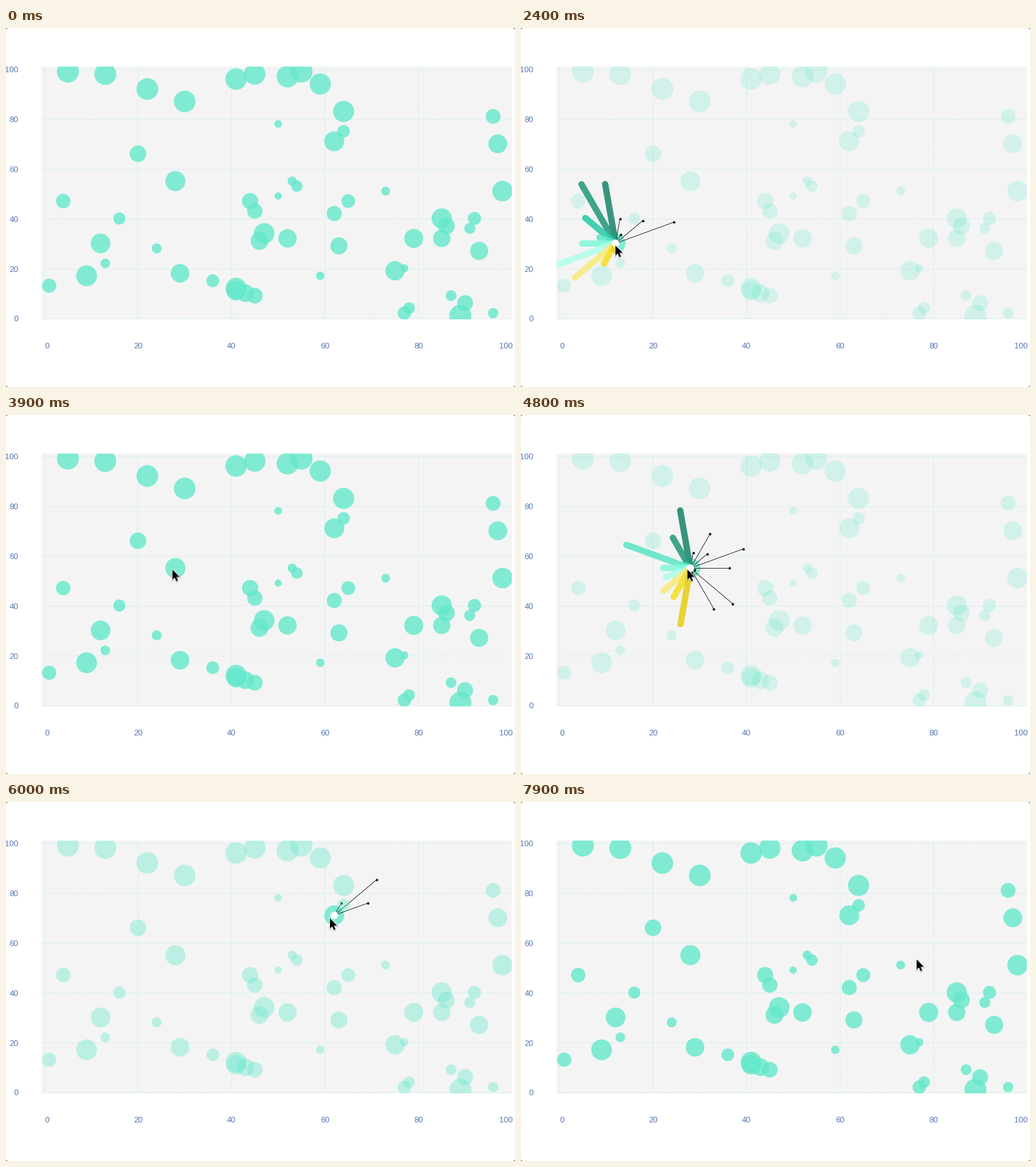
A matplotlib script that plays this animation: 806x568 px, repeating every 8000 ms.

```python
import numpy as np
import matplotlib.pyplot as plt
from matplotlib.animation import FuncAnimation
from matplotlib.patches import Circle, Polygon, Rectangle

W, H, DPI = 806, 568, 64
PX = 72 / DPI  # points per pixel
STEP, FRAMES = 100, 80

MINT = (100 / 255, 232 / 255, 203 / 255)
FULL, DIM = 0.8, 0.24
BAR_COLORS = ["#238a70", "#2c9c80", "#30cbab", "#62e6c8", "#86f9dd",
              "#b4fdea", "#f8ec82", "#f5df2c", "#e8cf22"]

# the chart's data, from the largest bubble to the smallest
POINTS = [
    (5, 99), (55, 99), (89, 1), (13, 98), (52, 97), (22, 92), (30, 87),
    (41, 96), (45, 98), (59, 94), (64, 83), (41, 12), (9, 17), (47, 34),
    (98, 51), (85, 40), (28, 55), (62, 71), (12, 30), (41, 11), (75, 19),
    (79, 32), (97, 70), (29, 18), (52, 32), (93, 27), (46, 31), (43, 10),
    (85, 32), (63, 29), (86, 37), (20, 66), (44, 47), (90, 6), (45, 9),
    (45, 43), (62, 42), (96, 81), (4, 47), (1, 13), (65, 47), (77, 2),
    (92, 40), (36, 15), (64, 75), (16, 40), (78, 4), (54, 53), (91, 36),
    (87, 9), (96, 2), (24, 28), (13, 22), (53, 55), (73, 51), (59, 17),
    (77, 20), (50, 78), (50, 49),
]

# start time, bubble, mean spoke length, its slope, waves (height, peak, period)
BURSTS = [
    (1850, (12, 30), 55, 2.5, [(45, -0.25, 4.9)]),
    (3900, (28, 55), 54, 0, [(36, 2, 2.5), (28, 0.3, 3.6)]),
    (5850, (62, 71), 72, 0, [(60, 0.9, 3.5)]),
]
SPOKES, STAGGER, GROW, STAY, SHRINK = 18, 43, 350, 1300, 300

CURSOR_KEYS = [(700, 255, 538), (1700, 158, 376), (1900, 149.5, 344),
               (3150, 149.5, 344), (3800, 263.5, 244.5), (5150, 263.5, 244.5),
               (5850, 513, 184), (7150, 513, 184), (7900, 626.5, 249)]
ARROW = np.array([(0, 0), (0, 16.2), (3.7, 12.8), (6.2, 18.6), (8.9, 17.4),
                  (6.4, 11.8), (11.4, 11.6)])


def place(p):
    return 61 + 7.4 * p[0], 459 - 3.94 * p[1]


def bubble_radius(rank):
    return 17.4 - 11.7 * (rank / (len(POINTS) - 1)) ** 1.6


def spoke_length(i, mean, slope, waves):
    swing = sum(h * np.cos(2 * np.pi * (i - peak) / period)
                for h, peak, period in waves)
    return max(mean + slope * i + swing, 8)


def unit(v):
    return min(max(v, 0.0), 1.0)


def ease_out(v):
    return 1 - (1 - unit(v)) ** 3


def ease_in_out(v):
    v = unit(v)
    return 4 * v ** 3 if v < 0.5 else 1 - 4 * (1 - v) ** 3


def cursor_at(t):
    if t < CURSOR_KEYS[0][0]:
        return None
    for (t0, x0, y0), (t1, x1, y1) in zip(CURSOR_KEYS, CURSOR_KEYS[1:]):
        if t <= t1:
            k = (t - t0) / (t1 - t0)
            k = k * k * (3 - 2 * k)
            return np.array([x0 + (x1 - x0) * k, y0 + (y1 - y0) * k])
    return np.array(CURSOR_KEYS[-1][1:])


fig = plt.figure(figsize=(W / DPI, H / DPI), dpi=DPI, facecolor="white")
ax = fig.add_axes([0, 0, 1, 1])
ax.set_xlim(0, W)
ax.set_ylim(H, 0)
ax.axis("off")

# window corners
for cx, dx in ((0, 1), (W, -1)):
    for cy, dy in ((0, 1), (H, -1)):
        ax.add_patch(Polygon([(cx, cy), (cx + 2.5 * dx, cy), (cx, cy + 2.5 * dy)],
                             fc="#777777", lw=0))

# plot area, grid and labels
panel = Rectangle((56, 61), 745, 399.5, fc="#f4f4f4", lw=0, zorder=1)
ax.add_patch(panel)
grid = dict(color="#c6efe9", lw=0.9 * PX, ls=(0, (2, 1)), snap=False, zorder=2)
text = dict(color="#5577b3", fontsize=12.7 * PX, family="Liberation Sans",
            va="center_baseline")
for v in range(0, 101, 20):
    x, y = 61.2 + 7.4 * v, 460 - 3.94 * v
    if v < 100:
        ax.plot([x, x], [61, 460], **grid)
    ax.plot([56, 801], [y, y], **grid)
    ax.text(19.8, y - 0.2, str(v), ha="right", **text)
    ax.text({0: 65, 100: 791.3}.get(v, x), 502.8, str(v), ha="center", **text)

bubbles = {}
for rank, p in enumerate(POINTS):
    dot = Circle(place(p), bubble_radius(rank), fc=MINT, lw=0, alpha=FULL,
                 zorder=3 if rank < len(POINTS) / 2 else 5)
    ax.add_patch(dot)
    dot.set_clip_path(panel)
    bubbles[p] = dot

# spokes run counter-clockwise: thin lines on the right, thick bars on the left
spokes = []
for i in range(SPOKES):
    angle = 2 * np.pi * (i + 1) / SPOKES
    if np.cos(angle) < 0:
        style = dict(color=BAR_COLORS[i - 4], lw=10 * PX, alpha=0.9,
                     solid_capstyle="round")
    else:
        style = dict(color="#1c1c1c", lw=0.9 * PX, marker="o", markevery=[1],
                     ms=4 * PX, mew=0)
    line, = ax.plot([0, 0], [0, 0], zorder=4, **style)
    line.set_clip_path(panel)
    spokes.append((line, np.cos(angle), -np.sin(angle)))

hub = Circle((0, 0), 6, fc="white", lw=0, zorder=6)
ax.add_patch(hub)

# cursor layers with their downward shift: shadow, white rim, black arrow
pointer = [
    (Polygon(ARROW, fc="black", ec="black", lw=2.5 * PX, alpha=0.15, zorder=7), 1.2),
    (Polygon(ARROW, fc="white", ec="white", lw=1.8 * PX, zorder=8), 0),
    (Polygon(ARROW, fc="black", lw=0, zorder=9), 0),
]
for shape, _ in pointer:
    ax.add_patch(shape)


def draw(frame):
    t = frame * STEP
    level, active, hub_r = 0, None, 0
    for line, _, _ in spokes:
        line.set_visible(False)

    for start, point, *profile in BURSTS:
        age = t - start
        if not 0 < age < STAY + SHRINK:
            continue
        active = point
        left = 1 - ease_in_out((age - STAY) / SHRINK)
        level = ease_in_out(age / 250) * left
        hub_r = 6 * unit((age - 60) / 80) * left
        x, y = place(point)
        hub.center = x, y
        for i, (line, dx, dy) in enumerate(spokes):
            grown = ease_out((age - i * STAGGER) / GROW) * left
            if grown > 0:
                k = grown * spoke_length(i, *profile)
                line.set_data([x, x + k * dx], [y, y + k * dy])
                line.set_visible(True)

    hub.set_radius(hub_r)
    hub.set_visible(hub_r > 0)
    for p, dot in bubbles.items():
        dot.set_alpha(FULL if p == active else FULL + (DIM - FULL) * level)

    tip = cursor_at(t)
    for shape, shift in pointer:
        shape.set_visible(tip is not None)
        if tip is not None:
            shape.set_xy(ARROW + tip + [0, shift])
    return []


anim = FuncAnimation(fig, draw, frames=FRAMES, interval=STEP, repeat=True,
                     repeat_delay=0, init_func=lambda: draw(0), blit=False)
plt.show()
```
